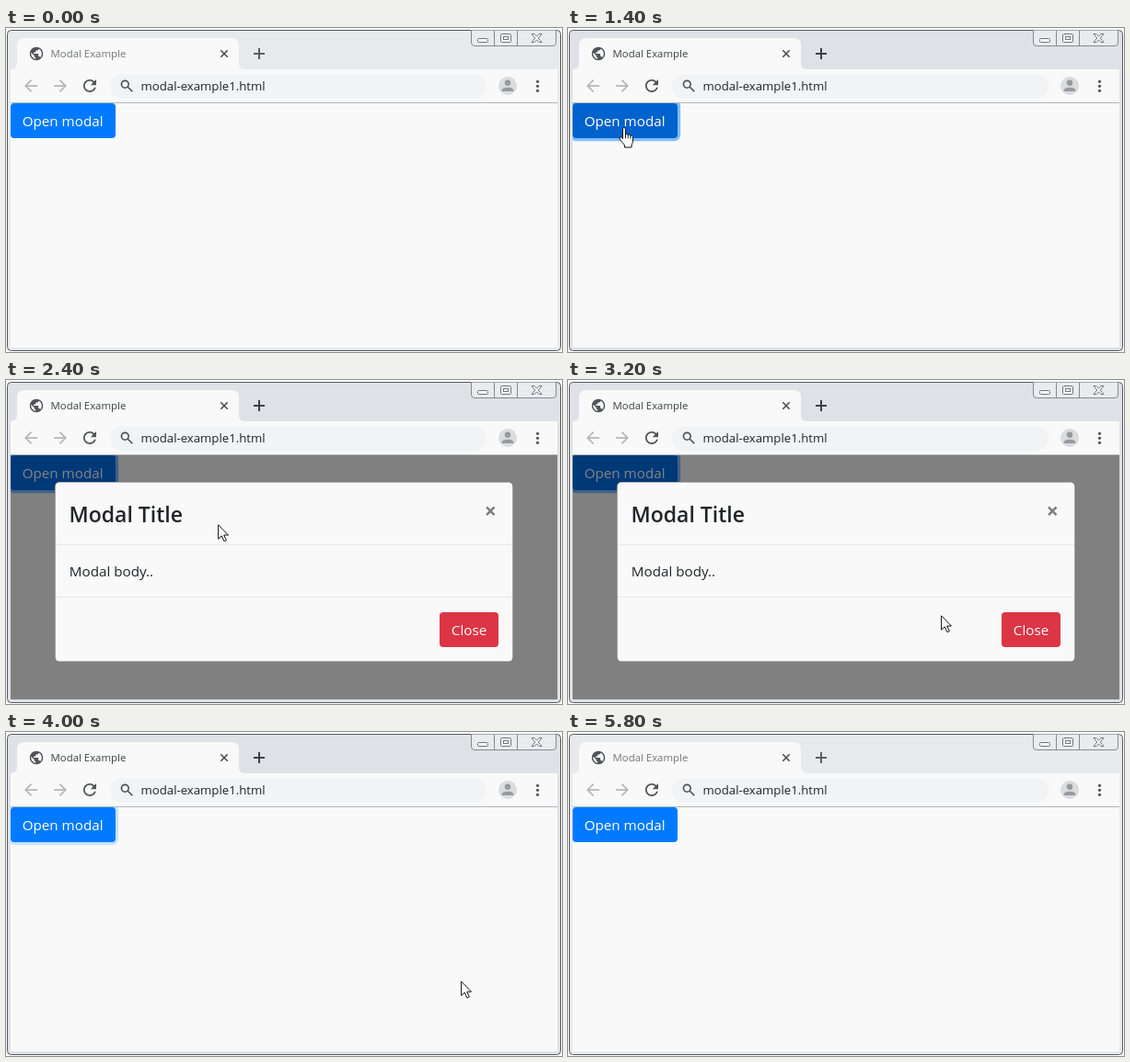
These frames come from a looping animation (604 by 353 pixels, 5.9 s). An HTML page:

```html
<!DOCTYPE html>
<html lang="en">
<head>
<meta charset="utf-8">
<title>Modal Example</title>
<style>
  html, body { margin: 0; width: 100%; height: 100%; overflow: hidden; background: #fff; }
  svg { display: block; width: 604px; height: 353px; }
  text { font-family: "Open Sans", "Noto Sans", sans-serif; font-size: 15.2px; fill: #212529; }
  .line { fill: none; stroke: #4b4e52; }
  .icon { fill: #505357; }
  .off { fill: #b6b8bb; }
  .glass { fill: #fbfbfc; stroke: #70747c; }
  .pointer { fill: #fff; stroke: #111; stroke-linejoin: round; }
</style>
</head>
<body>
<svg viewBox="0 0 604 353">
  <defs>
    <clipPath id="page"><rect x="5" y="82" width="594" height="266"/></clipPath>
  </defs>

  <!-- window frame and tab -->
  <rect id="frame" x="1.5" y="2.5" width="601" height="349" rx="4" stroke="#55585d"/>
  <path fill="#f9f9f9" d="M5 45q7 0 7-7V19q0-8 8-8H245q8 0 8 8V38q0 7 7 7z"/>
  <rect x="5" y="45" width="594" height="303" fill="#f9f9f9"/>
  <path class="icon" transform="translate(24.4 19.4) scale(.72)" d="M12 2C6.48 2 2 6.48 2 12s4.48 10 10 10 10-4.48 10-10S17.52 2 12 2zm-1 17.93c-3.95-.49-7-3.85-7-7.93 0-.62.08-1.21.21-1.79L9 15v1c0 1.1.9 2 2 2zm6.9-2.54c-.26-.81-1-1.39-1.9-1.39h-1v-3c0-.55-.45-1-1-1H8v-2h2c.55 0 1-.45 1-1V7h2c1.1 0 2-.9 2-2v-.41c2.93 1.19 5 4.06 5 7.41 0 2.08-.8 3.97-2.1 5.39z"/>
  <text id="tabTitle" x="48.5" y="32" style="font-size:11.4px">Modal Example</text>
  <path class="line" stroke-width="1.6" d="M233.3 24.3l7.4 7.4m0-7.4l-7.4 7.4"/>
  <path id="plus" class="line" stroke-width="2" d="M269 28h12m-6-6v12"/>

  <!-- window buttons -->
  <path fill="#e9ebee" stroke="#85898f" d="M505.5 2.5V16q0 3.5 3.5 3.5H594q3.5 0 3.5-3.5V2.5M530.5 3v16M555.5 3v16"/>
  <rect class="glass" x="512.5" y="11.5" width="11" height="4" rx="1.2"/>
  <rect class="glass" x="537.5" y="6.5" width="11" height="9" rx="1.2"/>
  <rect class="glass" x="540.5" y="9.5" width="5" height="3"/>
  <path class="glass" d="M571 6.5h3l2.5 2.6 2.5-2.6h3l-3.8 4.5 3.8 4.5h-3l-2.5-2.6-2.5 2.6h-3l3.8-4.5z"/>

  <!-- toolbar -->
  <path id="arrow" class="off" transform="translate(16.5 52.5) scale(.875)" d="M20 11H7.83l5.59-5.59L12 4l-8 8 8 8 1.41-1.41L7.83 13H20z"/>
  <use href="#arrow" transform="matrix(-1 0 0 1 86 0)"/>
  <path class="icon" transform="translate(80.5 52.5) scale(.875)" d="M17.65 6.35C16.2 4.9 14.21 4 12 4c-4.42 0-7.99 3.58-7.99 8s3.57 8 7.99 8c3.73 0 6.84-2.55 7.73-6h-2.08c-.82 2.33-3.04 4-5.65 4-3.31 0-6-2.69-6-6s2.69-6 6-6c1.66 0 3.14.69 4.22 1.78L13 11h7V4z"/>
  <rect x="113" y="50" width="409" height="27" rx="13.5" fill="#f1f3f4"/>
  <g class="line" stroke-width="1.6">
    <circle cx="129.3" cy="61.3" r="3.9"/>
    <path d="M132.3 64.3l5 5"/>
  </g>
  <text x="146.5" y="68" style="font-size:13.2px">modal-example1.html</text>
  <circle cx="545" cy="63" r="10" fill="#dadce0"/>
  <g fill="#96999e">
    <circle cx="545" cy="59.8" r="3.2"/>
    <path d="M538.5 69q0-4.3 6.5-4.3t6.5 4.3z"/>
  </g>
  <g class="icon">
    <circle cx="577.5" cy="58.3" r="1.6"/><circle cx="577.5" cy="63.3" r="1.6"/><circle cx="577.5" cy="68.3" r="1.6"/>
  </g>
  <path d="M5 81.5H599" stroke="#b4b6b9"/>

  <!-- page -->
  <g clip-path="url(#page)">
    <rect id="openRing" x="1.8" y="78.8" width="120.4" height="44.4" rx="7" fill="#80bdff"/>
    <rect id="open" x="5" y="82" width="114" height="38" rx="4"/>
    <text x="17.7" y="107" style="fill:#fff">Open modal</text>
    <g id="modal">
      <rect x="5" y="82" width="594" height="266" fill="#000" opacity=".486"/>
      <rect x="53" y="111" width="498" height="196" rx="4.8" fill="#666"/>
      <rect x="53.6" y="111.6" width="496.8" height="194.8" rx="4.2" fill="#f9f9f9"/>
      <path d="M54 179.5H550M54 236.5H550" stroke="#e6e8eb"/>
      <text x="68.5" y="155" style="font-size:23px;font-weight:600">Modal Title</text>
      <text x="526.3" y="150.5" text-anchor="middle" style="font-size:23px;font-weight:700;fill:#7d7d7d">×</text>
      <text x="68.8" y="214">Modal body..</text>
      <rect id="closeRing" x="467.8" y="249.8" width="70.4" height="44.4" rx="7" fill="#ec979f"/>
      <rect id="close" x="471" y="253" width="64" height="38" rx="4"/>
      <text x="503" y="278" text-anchor="middle" style="fill:#fff">Close</text>
    </g>
  </g>

  <!-- pointers -->
  <path id="arrowTip" class="pointer" d="M.6 .8V16.2l3.6-3.4 2.7 5.9 2.5-1.1-2.7-5.6h4.8z"/>
  <g id="hand" class="pointer">
    <path d="M4.5 2.3c0-2.2 3-2.2 3 0V8.2c.3-1 2.6-.9 2.7.5 .6-.9 2.6-.6 2.7.9 .8-.7 2.6-.2 2.6 1.4V15c0 2-1.2 3-1.5 5v2H6.5v-2C5.5 18 3 15.5 1.2 13 .2 11.5 1.8 10.2 3.2 11.3L4.5 12.8z"/>
    <path d="M7.5 8.2v4M10.2 8.7v3.6M12.9 9.6v3" fill="none"/>
  </g>
</svg>
<script>
const LOOP = 5900, STEP = 100;
const $ = id => document.getElementById(id);

// Pointer stops: time, shape, x, y. Moves are linear between stops.
const stops = [
  [0, '', 576, 196], [400, 'arrowTip', 576, 196], [900, 'hand', 74, 94],
  [1000, 'hand', 57, 106], [1100, 'hand', 55, 108], [1400, 'hand', 55, 108],
  [1500, 'arrowTip', 58, 108], [1600, 'arrowTip', 58, 108], [2200, 'arrowTip', 290, 172],
  [2300, 'arrowTip', 262, 156], [2400, 'arrowTip', 230, 157], [2500, 'arrowTip', 218, 180],
  [2600, 'arrowTip', 208, 202], [2700, 'arrowTip', 190, 188], [2800, 'arrowTip', 178, 168],
  [3000, 'arrowTip', 275, 205], [3200, 'arrowTip', 405, 256], [3300, 'hand', 472, 274],
  [3400, 'hand', 484, 277], [3600, 'hand', 490, 270], [3900, 'hand', 490, 270],
  [4000, 'arrowTip', 494, 271], [4200, 'arrowTip', 494, 274], [4300, 'arrowTip', 494, 274],
  [4400, 'arrowTip', 494, 280], [4500, '', 494, 280]
];

// Held values: each takes effect at its time.
const tracks = {
  active: [[0, 0], [1200, 1], [5700, 0]],
  modal: [[0, 0], [1500, 1], [4000, 0]],
  open: [[0, '#007bff'], [1000, '#0072ec'], [1100, '#0069d9'], [1300, '#0062cc'],
         [1500, '#006ee6'], [3900, '#007bff']],
  openRing: [[0, 0], [1200, .4], [1300, .8], [1400, 1], [3900, 0], [4000, .4],
             [4100, .8], [4200, 1], [5700, .4], [5800, 0]],
  close: [[0, '#dc3545'], [3300, '#d22c3c'], [3400, '#c82333'], [3900, '#bd2130']],
  closeRing: [[0, 0], [3900, 1]]
};

const lastAt = (list, t) => list.findLastIndex(entry => entry[0] <= t);
const held = (name, t) => tracks[name][lastAt(tracks[name], t)][1];

function movePointer(t) {
  const i = lastAt(stops, t);
  const [t0, shape, x0, y0] = stops[i];
  const [t1, , x1, y1] = stops[i + 1] || [LOOP, '', x0, y0];
  const k = (t - t0) / (t1 - t0);
  const x = Math.round(x0 + (x1 - x0) * k);
  const y = Math.round(y0 + (y1 - y0) * k);
  for (const id of ['arrowTip', 'hand']) {
    $(id).style.display = id === shape ? '' : 'none';
    $(id).setAttribute('transform', `translate(${x} ${y})`);
  }
}

function draw(t) {
  const active = held('active', t);
  $('frame').style.fill = active ? '#dee1e6' : '#e7eaed';
  $('tabTitle').style.fill = active ? '#3c4043' : '#73767a';
  $('plus').style.stroke = active ? '#3c4043' : '#5c5f63';
  $('modal').style.display = held('modal', t) ? '' : 'none';
  for (const id of ['open', 'close']) {
    $(id).style.fill = held(id, t);
    $(id + 'Ring').style.opacity = held(id + 'Ring', t);
  }
  movePointer(t);
}

const start = performance.now();
function tick() {
  const t = (performance.now() - start) % LOOP;
  draw(Math.floor(t / STEP) * STEP);
  requestAnimationFrame(tick);
}
tick();
</script>
</body>
</html>
```
